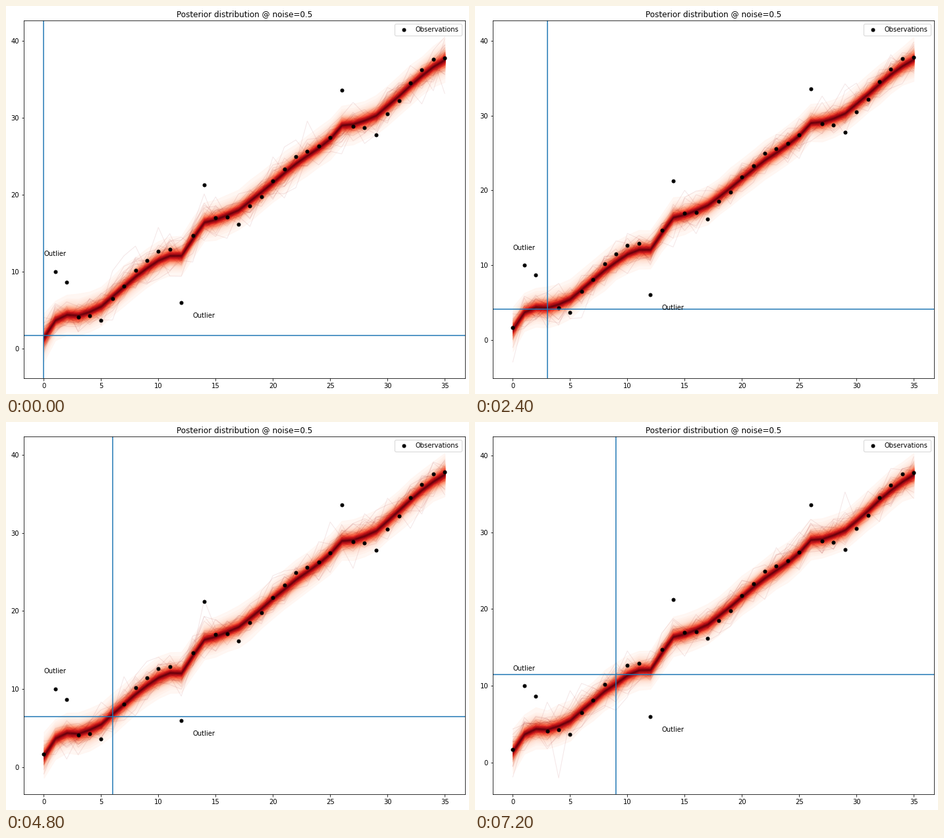
Recreate the animation shown at these times as a matplotlib script. Size 703 by 590 pixels, loop 8 s.

```python
import matplotlib.pyplot as plt
import numpy as np
from matplotlib.animation import FuncAnimation

W, H, DPI = 703, 590, 72
FRAMES, INTERVAL = 10, 800
DRAWS, SHOWN, DOF = 4000, 30, 8
GAIN, RHO = 0.19, 0.3  # pull of an observation, and its decay per step

# the tiny excess keeps the pixel size from rounding down
fig = plt.figure(figsize=((W + 1e-6) / DPI, (H + 1e-6) / DPI), dpi=DPI,
                 facecolor="white")
ax = fig.add_axes([27 / W, 24 / H, 669.6 / W, 543.6 / H])
reds = plt.get_cmap("Reds")


def observations():
    """Rising trend, yearly pattern and slow cycle, with two outliers."""
    season = [1.5, 1.6, 6.9, 1.4, 0.4, -1.45, 0.15, 0.6, 1.7, 2.2, 2.6, 2]
    cycle = 0.35 * np.cos(2 * np.pi * (x - 7.2) / 8.7)
    y = 1.02 * x + np.tile(season, 3) + cycle
    y[1], y[12] = 10, 6
    return y


x = np.arange(36)
observed = observations()
line = 0.7 + 1.048 * x
kernel = RHO ** np.abs(x[:, None] - x)
fitted = line + GAIN * kernel @ (observed - line)


def posterior_mean(hidden):
    """Estimate with one observation left out."""
    shift = GAIN * (observed[hidden] - fitted[hidden]) / (1 - GAIN)
    return fitted - shift * kernel[hidden]


def posterior_draws(hidden):
    """Weakly correlated paths around the estimate."""
    rng = np.random.default_rng(40 + hidden)
    noise = rng.standard_normal((DRAWS, x.size)) @ np.linalg.cholesky(kernel).T
    noise /= np.sqrt(rng.chisquare(DOF, noise.shape) / DOF)
    scale = np.full(x.size, 0.9)
    scale[[0, -1]] *= 1.12
    scale[hidden] *= 1.05
    return posterior_mean(hidden) + scale * noise


def plot_distribution(draws):
    percs = np.linspace(99, 51, 40)
    uppers = np.percentile(draws, percs, axis=0)
    lowers = np.percentile(draws, 100 - percs, axis=0)
    for shade, upper, lower in zip(np.linspace(0, 1, 40), uppers, lowers):
        ax.fill_between(x, upper, lower, color=reds(shade), alpha=0.8)
    ax.plot(x, draws[:SHOWN].T, color=reds(0.9), lw=1, alpha=0.1,
            scaley=False)


def draw(hidden):
    ax.clear()
    plot_distribution(posterior_draws(hidden))
    keep = x != hidden
    ax.plot(x[keep], observed[keep], "ok", ms=5, label="Observations",
            scaley=False)
    ax.axhline(observed[hidden], color="tab:blue", lw=1.5)
    ax.axvline(hidden, color="tab:blue", lw=1.5)
    ax.text(0, 12, "Outlier")
    ax.text(13, 4, "Outlier")
    ax.set_title("Posterior distribution @ noise=0.5")
    ax.legend(loc="upper right")
    return []


anim = FuncAnimation(fig, draw, frames=FRAMES, interval=INTERVAL,
                     init_func=lambda: [], repeat=True, repeat_delay=0)
plt.show()
```
